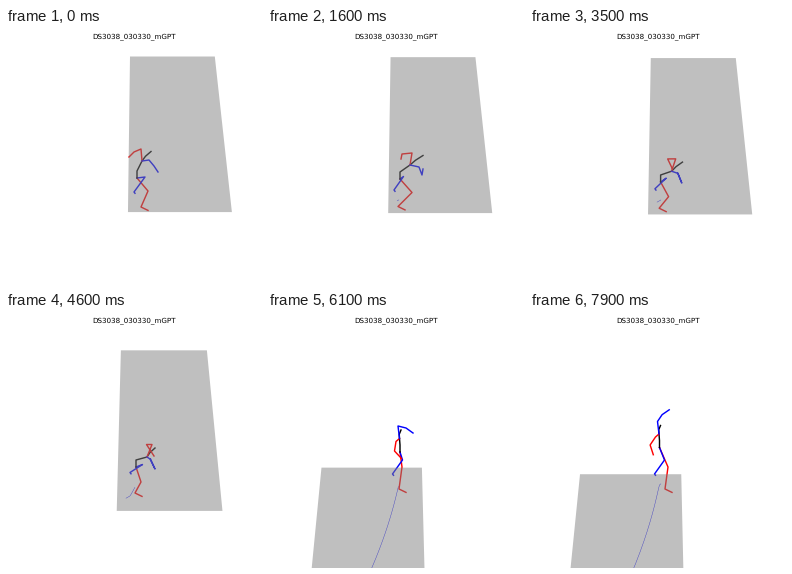
Write a matplotlib script that moves like this. It is 256 by 256 pixels and loops after 8000 ms.

```python
import numpy as np
import matplotlib.pyplot as plt
from matplotlib.animation import FuncAnimation
from matplotlib.patches import Polygon

SIZE, DPI = 256, 72
FRAMES, STEP = 80, 100

# key poses on the stage: time, root, chest, head, then the limbs as
# right leg, left leg (knee, foot), right arm, left arm (shoulder, elbow, hand)
POSES = [
    (0.0, 131+150j, 136+133j, 145+123.5j, 142+163j, 135+179j, 139+149j, 128+164j,
     135+121j, 128+124j, 123+129j, 143+132j, 148+138j, 152+144j),
    (1.6, 132+151j, 142+137j, 155+127.5j, 144+164.5j, 130+178.5j, 135.5+148.5j, 126+162j,
     144+125j, 134+126j, 133+131j, 151+139j, 154+147j, 155+141j),
    (4.6, 130+155j, 141+145j, 149+136j, 135+170j, 129+181j, 136.5+152.5j, 124+160.5j,
     146+132.5j, 140.5+132.5j, 148+144j, 144+147j, 149+157j, 144.5+147j),
    (5.3, 131+153j, 133.5+140j, 131+127j, 134+166.5j, 130.5+180.5j, 130+168j, 118+175j,
     138+128.5j, 147+130j, 153+138.5j, 130+138j, 142+144.5j, 148+139j),
    (6.1, 132+140j, 131.5+126.5j, 133+118j, 134+155j, 131+177j, 134.5+148j, 124.5+162j,
     128+129.5j, 126.5+139j, 133.5+146.5j, 130+114j, 138+116j, 145+121j),
]
TIMES = np.array([p[0] for p in POSES])
JOINTS = np.array([p[1:] for p in POSES])
XY = np.stack([JOINTS.real, JOINTS.imag])


def slopes():
    """Monotone slopes: harmonic means of the neighbouring rates."""
    rate = np.diff(XY, axis=1) / np.diff(TIMES)[:, None]
    a, b = rate[:, :-1], rate[:, 1:]
    same = a * b > 0
    m = np.zeros_like(XY)
    m[:, 1:-1] = np.where(same, 2 * a * b / np.where(same, a + b, 1), 0)
    return m


SLOPES = slopes()


def blend(t):
    t = min(t, TIMES[-1])
    i = min(np.searchsorted(TIMES, t, "right"), len(TIMES) - 1) - 1
    h = TIMES[i + 1] - TIMES[i]
    s = (t - TIMES[i]) / h
    x, y = ((1 + 2 * s) * (1 - s) ** 2 * XY[:, i]
            + s * (1 - s) ** 2 * h * SLOPES[:, i]
            + s * s * (3 - 2 * s) * XY[:, i + 1]
            + s * s * (s - 1) * h * SLOPES[:, i + 1])
    return x + 1j * y


def ease(s):
    s = np.clip(s, 0, 1)
    return s * s * (3 - 2 * s)


def swing(arm, degrees):
    return arm[0] + (arm - arm[0]) * np.exp(1j * np.radians(degrees))


def limbs(t):
    p = blend(t)
    # after the climb the body straightens and both arms swing
    rise = ease((t - TIMES[-1]) / 1.8)
    p[:3] += (-2.5 - 4.5j) * rise
    p[7:] += (-2.5 - 4.5j) * rise
    p[3:5] += 4 * rise
    root, chest, head = p[:3]
    right = swing(p[7:10], 25 * rise)
    left = swing(p[10:13], -70 * rise)
    return [
        [root, p[3], p[4], p[4] + 7 + 3.4j],
        [root, p[5], p[6], p[6] + 1 + 1.3j],
        [root, root - 7j, chest, (chest + head) / 2 - 1, head],
        [chest, *right],
        [chest, *left],
    ]


def sigmoid(x):
    return 1 / (1 + np.exp(-x))


def travel(t):
    """Distance walked sideways and in depth: slow drift plus one surge."""
    side = 0.9 * t + 53.4 * sigmoid(4.4 * (t - 5.13))
    depth = 0.0006 * t + 0.1576 * sigmoid(3.9 * (t - 5.257))
    return np.array([side, depth])


def project(x, depth):
    """Ground point to stage, with the vanishing point far above."""
    return np.column_stack([133 + x / depth, 690 / depth - 661.5])


def floor(t):
    side, depth = travel(t)
    x = np.array([-9, 75.8, 75.8, -9]) - side
    return project(x, np.array([1, 1, 0.816, 0.816]) - depth)


def trail(t):
    past = np.linspace(0, max(t - STEP / 1000, 0), 120)
    side, depth = travel(past) - travel(t)[:, None]
    return project(-1.7 + side, 0.828 + depth)


plt.rcParams["text.hinting"] = "none"
fig = plt.figure(figsize=(SIZE / DPI, SIZE / DPI), dpi=DPI, facecolor="white")
ax = fig.add_axes([0, 0, 1, 1])
ax.set_xlim(0, SIZE)
ax.set_ylim(SIZE, 0)
ax.axis("off")
ax.text(128, 10, "DS3038_030330_mGPT", fontsize=7.11, ha="center",
        va="baseline", family="DejaVu Sans")

track, = ax.plot([], [], color="blue", lw=0.42, zorder=2)
lines = [ax.plot([], [], color=c, lw=1.42, zorder=3)[0]
         for c in ("red", "blue", "black", "red", "blue")]
# the translucent floor veils whatever lies behind it
ground = ax.add_patch(Polygon(floor(0), closed=True, lw=0,
                              facecolor=(0.5, 0.5, 0.5, 0.5), zorder=4))


def draw(i):
    t = i * STEP / 1000
    ground.set_xy(floor(t))
    track.set_data(*trail(t).T)
    for line, limb in zip(lines, limbs(t)):
        line.set_data(np.real(limb), np.imag(limb))
    return [ground, track, *lines]


anim = FuncAnimation(fig, draw, frames=FRAMES, interval=STEP,
                     repeat=True, repeat_delay=0, blit=False)
plt.show()
```
